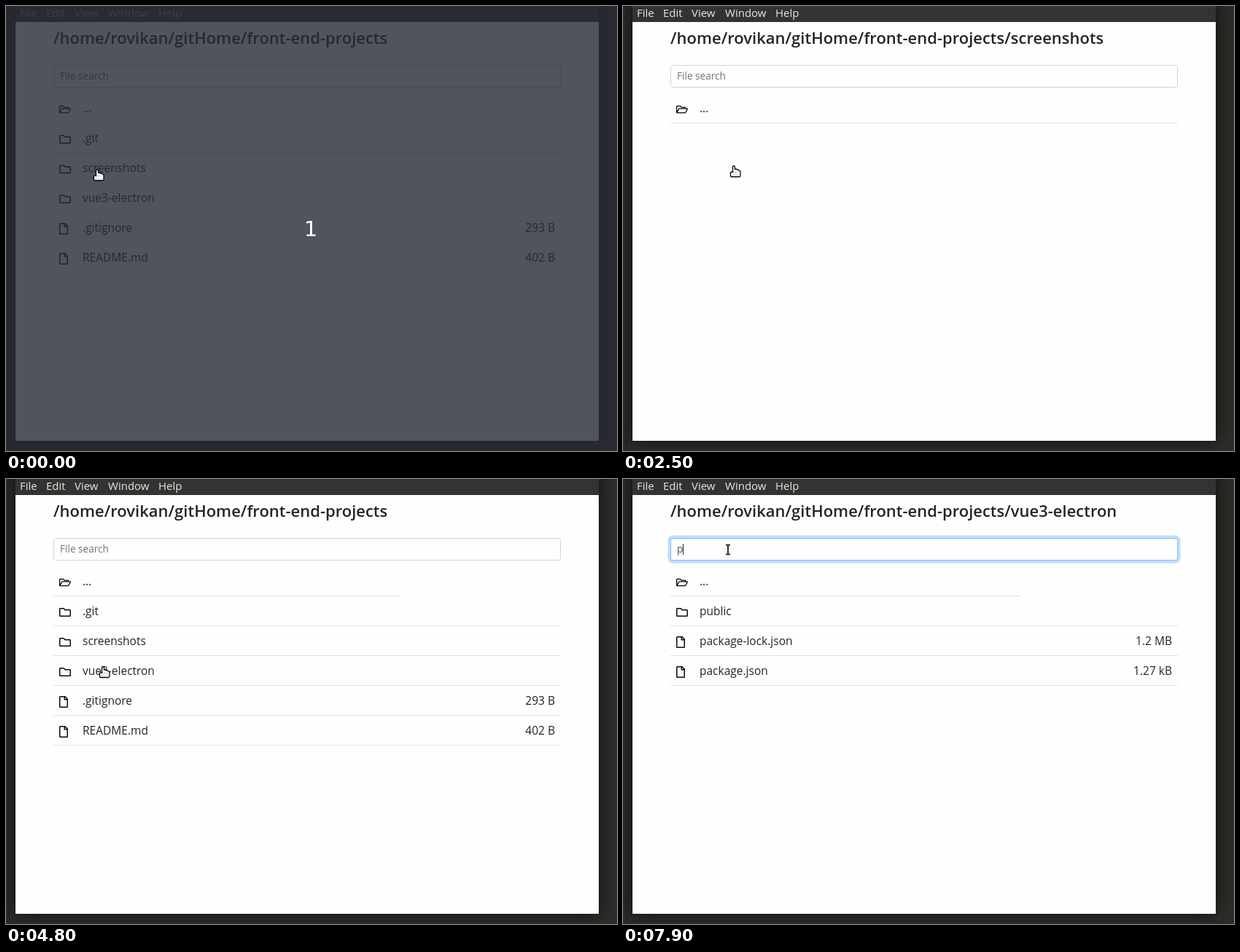
Animation, 838 px wide and 611 px high, one loop 8000 ms. Source, as an HTML page with a canvas:

```html
<!DOCTYPE html>
<html lang="en">
<head>
<meta charset="utf-8">
<title>File explorer</title>
<style>
html, body { margin: 0; width: 100%; height: 100%; overflow: hidden; background: #2b2a28; }
canvas { display: block; }
</style>
</head>
<body>
<canvas id="stage" width="838" height="611"></canvas>
<script>
const ctx = document.getElementById('stage').getContext('2d');
const LOOP = 8000, STEP = 100;
const SANS = '"Open Sans", "Noto Sans", sans-serif';
const INK = '#212529';

const HOME = '/home/rovikan/gitHome/front-end-projects';
const root = {
  path: HOME, firstLine: 475,
  rows: [['.git'], ['screenshots'], ['vue3-electron'], ['.gitignore', '293 B'], ['README.md', '402 B']]
};
const shots = { path: HOME + '/screenshots', firstLine: 696, rows: [] };
const app = {
  path: HOME + '/vue3-electron', firstLine: 479,
  rows: [
    ['dist_electron'], ['node_modules'], ['public'], ['src'],
    ['babel.config.js', '73 B'], ['package-lock.json', '1.2 MB'], ['package.json', '1.27 kB'],
    ['README.md', '1.47 kB'], ['vue.config.js', '320 B']
  ]
};

const icons = {
  open: new Path2D('M.67 12V4Q.67 3.33 1.33 3.33H5.4L7.2 5.1H12Q12.7 5.1 12.7 5.8V6.9' +
    'M.9 12.4L3.6 7.5Q3.9 6.9 4.5 6.9H14.7Q15.6 6.9 15.2 7.7L13.1 11.8Q12.7 12.67 12 12.67H1.3Q.67 12.67 .67 12'),
  folder: new Path2D('M.75 3.5Q.75 2.75 1.5 2.75H6.1L8.1 4.75H14.5Q15.25 4.75 15.25 5.5' +
    'V12.5Q15.25 13.25 14.5 13.25H1.5Q.75 13.25 .75 12.5Z'),
  file: new Path2D('M1.5 .75H8L11.25 4V14.5Q11.25 15.25 10.5 15.25H1.5Q.75 15.25 .75 14.5' +
    'V1.5Q.75 .75 1.5 .75ZM7.25 .75V4.75H11.25')
};
const hand = new Path2D('M-3.5 1V-5.8Q-3.5 -7.5 -2 -7.5Q-.5 -7.5 -.5 -5.8V-3Q1 -3.7 2 -2.3' +
  'Q3.6 -2.9 4.5 -1.4Q7 -1.6 7 1V6Q7 7.5 5.5 7.5H-5Q-6.5 7.5 -6.5 5.8V1.8Q-6 .2 -3.5 1Z');
const beam = new Path2D('M-3 -6.5H-1Q0 -6.5 0 -5.5V5.5Q0 6.5 -1 6.5H-3M3 -6.5H1Q0 -6.5 0 -5.5M0 5.5Q0 6.5 1 6.5H3');

// time, x, y of the pointer centre
const track = [
  [1100, 127, 232], [1300, 150, 220], [1500, 150, 220], [1600, 154, 229], [1700, 154, 229],
  [1800, 155, 235], [1900, 154, 227], [2800, 154, 227], [3400, 111, 149], [3600, 111, 149],
  [4200, 122, 205], [4300, 122, 205], [4800, 135, 265], [5300, 135, 265], [6200, 143, 116],
  [6300, 144, 105], [6400, 144, 97]
];

const mix = (a, b, k) => a + (b - a) * k;
const smooth = k => k * k * (3 - 2 * k);

function pointerAt(t) {
  const i = track.findIndex(p => p[0] > t);
  if (i === 0) return track[0].slice(1);
  if (i < 0) return track[track.length - 1].slice(1);
  const a = track[i - 1], b = track[i];
  const k = smooth((t - a[0]) / (b[0] - a[0]));
  return [mix(a[1], b[1], k), mix(a[2], b[2], k)].map(Math.round);
}

function viewAt(t) {
  if (t < 2500) return root;
  if (t < 3600) return shots;
  if (t < 4900) return root;
  if (t < 7900) return app;
  return { ...app, rows: app.rows.filter(r => r[0].startsWith('p')) };
}

function focusAt(t) {
  return t < 6600 ? 0 : t < 6700 ? 0.3 : t < 7000 ? 0.9 : 1;
}

function box(x, y, w, h, color) {
  ctx.fillStyle = color;
  ctx.fillRect(x, y, w, h);
}

function label(text, x, y, size, color, align = 'left', weight = 400) {
  ctx.font = `${weight} ${size}px ${SANS}`;
  ctx.textAlign = align;
  ctx.fillStyle = color;
  ctx.fillText(text, x, y);
}

function drawWindow(active) {
  box(0, 0, 838, 611, '#2e2d2a');
  ctx.save();
  ctx.shadowColor = `rgba(0,0,0,${active ? 0.65 : 0.4})`;
  ctx.shadowBlur = active ? 24 : 18;
  box(12, -20, 802, 618, '#1e1d1c');
  ctx.restore();
  box(4, 0, 1, 611, '#201f1e');
  box(13, 0, 800, 22, '#353331');
  box(13, 22, 800, 575, '#fefefe');
  const color = active ? '#e9e7e3' : '#8f8d89';
  [['File', 19], ['Edit', 55], ['View', 94], ['Window', 140], ['Help', 209]]
    .forEach(([name, x]) => label(name, x, 15, 15, color));
}

function drawSearch(t) {
  const f = focusAt(t);
  if (f) {
    const s = 3.5 * f;
    ctx.fillStyle = `rgba(0,123,255,${0.25 * f})`;
    ctx.beginPath();
    ctx.roundRect(65 - s, 81 - s, 696 + 2 * s, 31 + 2 * s, 3 + s);
    ctx.fill();
  }
  ctx.beginPath();
  ctx.roundRect(65.5, 81.5, 695, 30, 3);
  ctx.fillStyle = '#fefefe';
  ctx.fill();
  ctx.strokeStyle = `rgb(${mix(206, 128, f)},${mix(212, 189, f)},${mix(218, 255, f)})`;
  ctx.lineWidth = 1;
  ctx.stroke();

  const typed = t >= 7800;
  if (typed) label('p', 74, 101, 13.6, '#495057');
  else label('File search', 74, 101, 13.6, '#6c757d');
  if (t >= 6600 && (t < 7200 || typed)) box(typed ? 82 : 74, 89, 1, 15, INK);
}

function drawIcon(name, y) {
  ctx.save();
  ctx.translate(73, y);
  ctx.strokeStyle = '#080808';
  ctx.lineWidth = name === 'open' ? 1.33 : 1.5;
  ctx.lineJoin = 'round';
  ctx.stroke(icons[name]);
  ctx.restore();
}

function drawRow(i, icon, name, size = '', width = 696) {
  const top = 120 + 41 * i;
  drawIcon(icon, top + 14);
  label(name, 105, top + 26, 15.5, INK);
  label(size, 753, top + 26, 15.5, INK, 'right');
  box(65, top + 40, width, 1, '#dee0e2');
}

function drawPointer(t) {
  ctx.save();
  ctx.translate(...pointerAt(t));
  ctx.lineJoin = 'round';
  if (t < 6300) {
    ctx.fillStyle = '#fff';
    ctx.fill(hand);
    ctx.strokeStyle = '#000';
    ctx.lineWidth = 1.3;
    ctx.stroke(hand);
    for (const x of [-3, 0, 3]) box(x, 1, 1, 1, '#555');
    box(-4, 4, 9, 1, '#ddd');
  } else {
    for (const [color, width] of [['#fff', 3.4], ['#000', 1.6]]) {
      ctx.strokeStyle = color;
      ctx.lineWidth = width;
      ctx.stroke(beam);
    }
  }
  ctx.restore();
}

function draw(t) {
  const view = viewAt(t);
  drawWindow(t >= 2400);
  label(view.path, 65, 52, 22, INK, 'left', 600);
  drawSearch(t);
  drawRow(0, 'open', '...', '', view.firstLine);
  view.rows.forEach(([name, size], i) => drawRow(i + 1, size ? 'file' : 'folder', name, size));

  const counting = t < 500;
  if (counting) box(0, 0, 838, 611, 'rgba(38,42,52,.8)');
  drawPointer(t);
  if (counting) {
    ctx.font = '29px "DejaVu Sans", sans-serif';
    ctx.textAlign = 'center';
    ctx.fillStyle = '#fff';
    ctx.fillText('1', 418, 316);
  }
}

const start = performance.now();
function tick() {
  const t = (performance.now() - start) % LOOP;
  draw(Math.floor(t / STEP) * STEP);
  requestAnimationFrame(tick);
}
tick();
</script>
</body>
</html>
```
